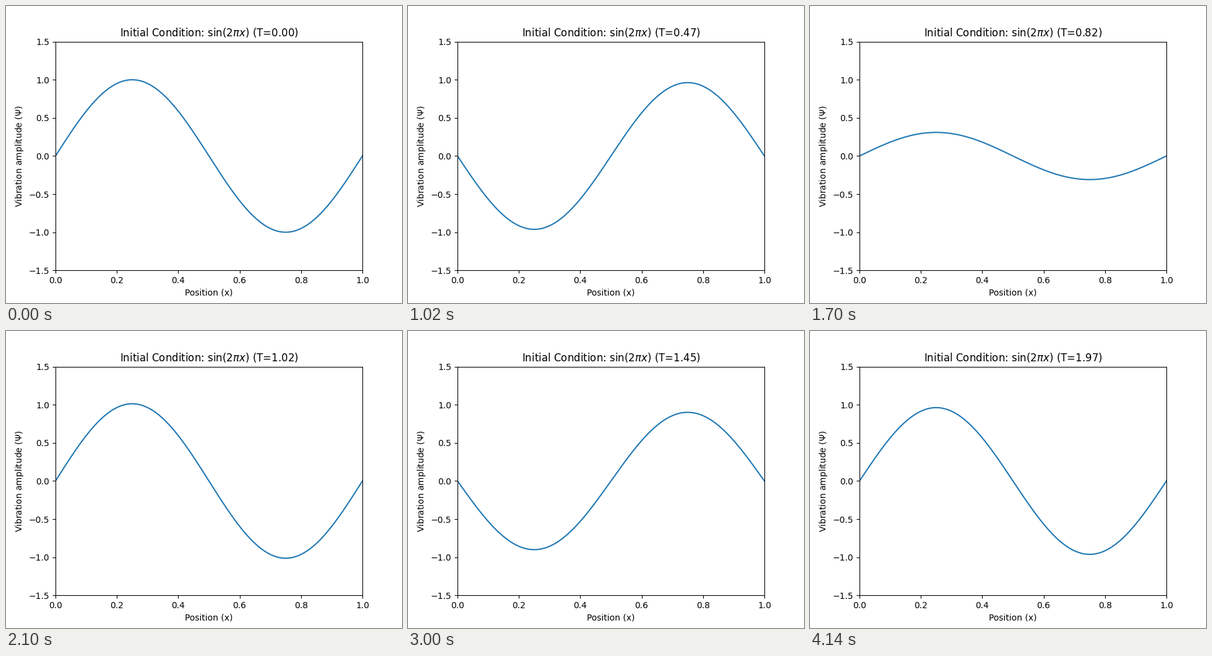
Recreate the animation shown at these times as a matplotlib script. Size 640x480 px, loop 4.16 s.

```python
import numpy as np
import matplotlib.pyplot as plt
from matplotlib.animation import FuncAnimation

TICK = 20                      # ms per animation frame
HOLDS = [1, 5, 1, 5, 1]        # ticks each pose is held, repeating
POSES = 80
DT = 0.001                     # integration step of the wave
STEPS = 25                     # integration steps per pose

OMEGA = 2 * np.pi
# unit initial velocity plus the phase lag of a first-order start
SWING = 1 / OMEGA + np.tan(OMEGA * DT / 2)

schedule = np.repeat(np.arange(POSES), np.resize(HOLDS, POSES))

x = np.linspace(0, 1, 201)
mode = np.sin(2 * np.pi * x)

fig, ax = plt.subplots(figsize=(6.4, 4.8), dpi=100)
line, = ax.plot(x, mode, color="#1f77b4", lw=1.5)
ax.set_xlim(0, 1)
ax.set_ylim(-1.5, 1.5)
ax.set_xlabel("Position (x)")
ax.set_ylabel(r"Vibration amplitude ($\Psi$)")
title = ax.set_title("")


def amplitude(t):
    return np.cos(OMEGA * t) + SWING * np.sin(OMEGA * t)


def update(i):
    step = int(schedule[i]) * STEPS
    line.set_ydata(amplitude(step * DT) * mode)
    shown = step // 10 / 100   # clock is cut, not rounded
    title.set_text(rf"Initial Condition: $\sin(2\pi x)$ (T={shown:.2f})")
    return line, title


anim = FuncAnimation(fig, update, frames=len(schedule), interval=TICK,
                     repeat=True, repeat_delay=0)
plt.show()
```
